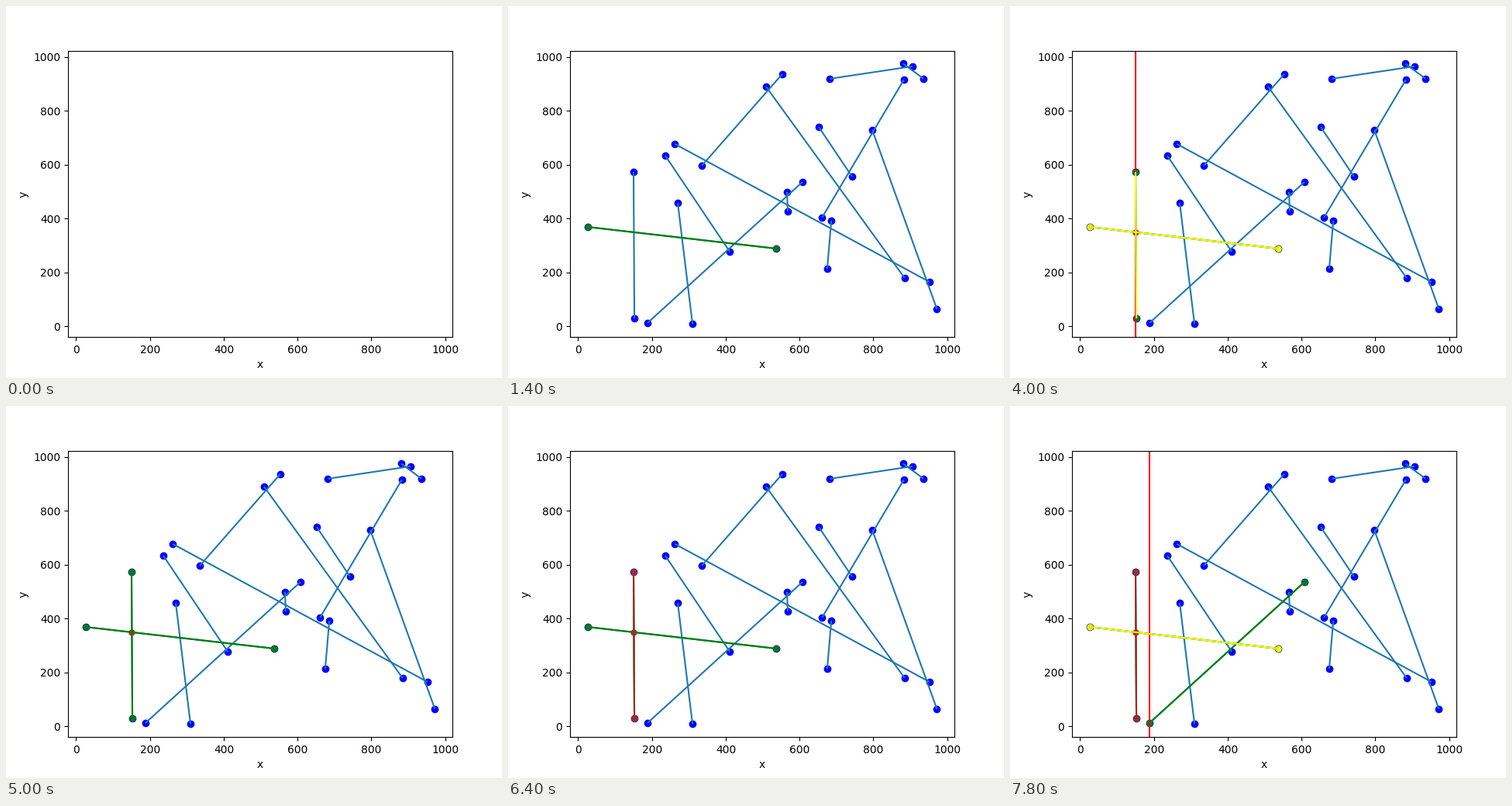
A matplotlib script for the animation above (8 s loop, 640 px wide and 480 px high).

```python
import matplotlib.pyplot as plt
import numpy as np
from matplotlib.animation import FuncAnimation
from matplotlib.collections import LineCollection

STEP_MS = 200
FRAMES = 40


def seg(x0, y0, x1, y1):
    return np.array([(x0, y0), (x1, y1)])


# the three segments the sweep reaches, left end first
FIRST = seg(25.4, 369, 536.6, 288.7)
SECOND = seg(150.2, 573.4, 152.5, 29.7)
THIRD = seg(188, 12.5, 608, 536)

# key points of the segments still waiting
WAITING = [
    seg(236, 634, 411, 277), seg(270, 458, 310, 8.5), seg(262, 677, 952, 165),
    seg(335, 596, 553, 936), seg(509, 890, 885, 179), seg(566, 499, 568, 427),
    seg(652, 740, 742, 556), seg(661, 404, 883, 916), seg(675, 214, 686, 392),
    seg(682, 919, 906, 965), seg(881, 975, 936, 919), seg(797, 729, 972.2, 64),
]

SEGMENTS = np.array([FIRST, SECOND, THIRD, *WAITING])
ENDS = SEGMENTS.reshape(-1, 2)

fig, ax = plt.subplots(figsize=(6.4, 4.8), dpi=100)
ax.set_xlabel("x")
ax.set_ylabel("y")

steps = []  # one (artist, visible) change per frame


def show(artist):
    steps.append((artist, True))
    return artist


def hide(*artists):
    steps.extend((artist, False) for artist in artists)


def dots(points, color, size=25):
    x, y = np.atleast_2d(points).T
    return show(ax.scatter(x, y, s=size, color=color))


def lines(segs, **style):
    return show(ax.add_collection(LineCollection(segs, **style)))


def sweep(x):
    return show(ax.axvline(x, color="red"))


def paint(s, color):
    """Colour the right end, the left end, then the line between them."""
    left, right = s
    return [dots(right, color), dots(left, color), lines([s], color=color)]


def crossing(s, t):
    d, e = s[1] - s[0], t[1] - t[0]
    k, _ = np.linalg.solve(np.column_stack((d, -e)), t[0] - s[0])
    return s[0] + k * d


def fit_axes(margin=0.05):
    lo, hi = ENDS.min(axis=0), ENDS.max(axis=0)
    pad = margin * (hi - lo)
    ax.set_xlim(lo[0] - pad[0], hi[0] + pad[0])
    ax.set_ylim(lo[1] - pad[1], hi[1] + pad[1])


def build():
    dots(ENDS, "blue", size=36)
    lines(SEGMENTS)

    # the sweep enters the first segment
    bar = sweep(FIRST[0, 0])
    paint(FIRST, "green")
    hide(bar)

    # second segment: test the pair and mark where they cross
    bar = sweep(SECOND[0, 0])
    paint(SECOND, "green")
    tested = paint(SECOND, "yellow") + paint(FIRST, "yellow")
    hit = crossing(FIRST, SECOND)
    dots(hit, "red")
    hide(*tested, bar)

    # the crossing, then the end of the second segment
    for x in (hit[0], SECOND[1, 0]):
        hide(sweep(x))
    paint(SECOND, "brown")

    # third segment: start testing its neighbour
    sweep(THIRD[0, 0])
    paint(THIRD, "green")
    paint(FIRST, "yellow")


def draw(frame):
    for artist, _ in steps:
        artist.set_visible(False)
    for artist, visible in steps[:frame]:
        artist.set_visible(visible)
    return []


build()
fit_axes()
anim = FuncAnimation(fig, draw, frames=FRAMES, interval=STEP_MS,
                     init_func=lambda: draw(0), repeat=True, repeat_delay=0)
plt.show()
```
